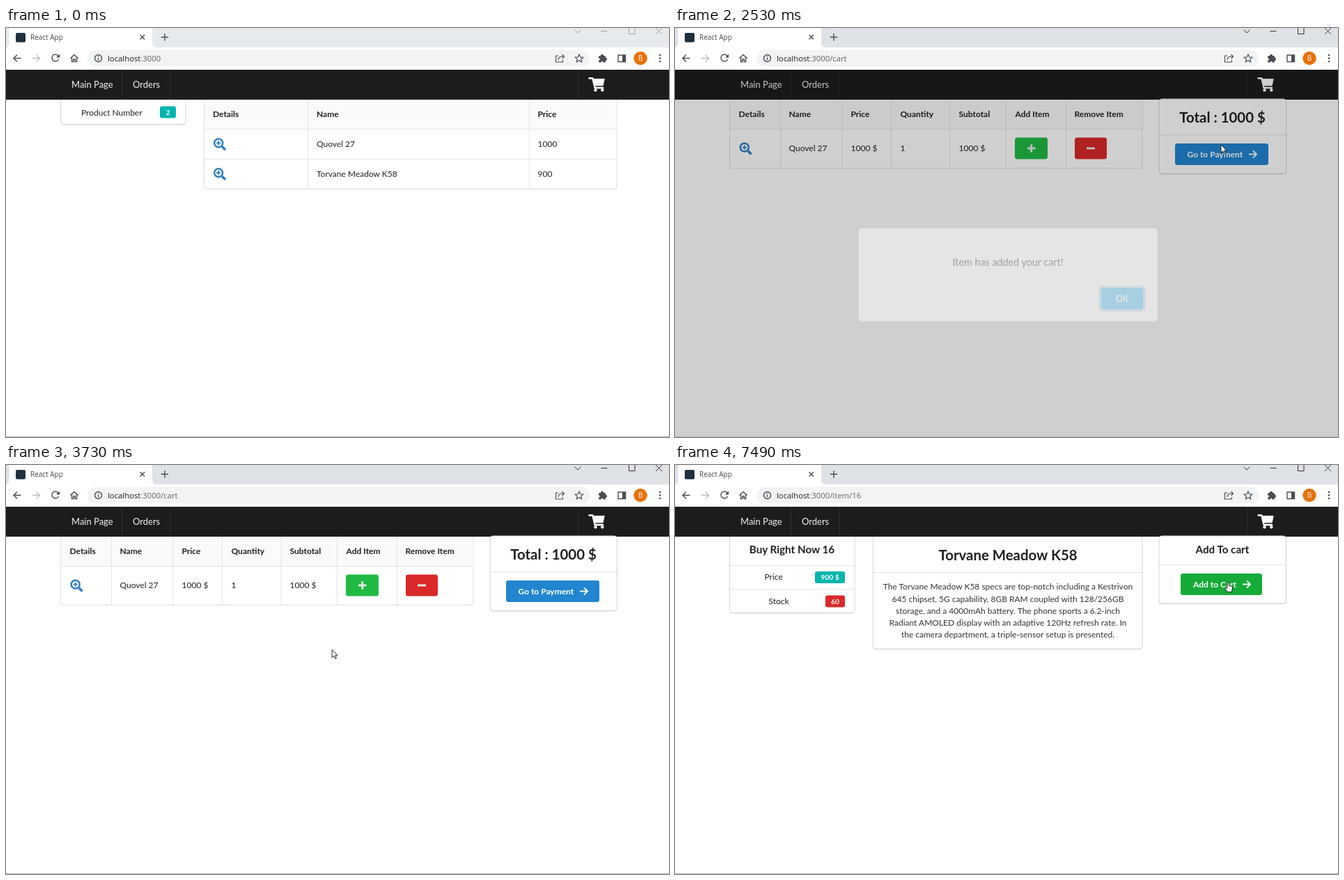
These frames come from a looping animation (952 px wide and 588 px high, 8 s). An HTML page:

```html
<!DOCTYPE html>
<html lang="en">
<head>
<meta charset="utf-8">
<title>Shop demo</title>
<style>
html, body { margin: 0; width: 100%; height: 100%; overflow: hidden; background: #fff; }
svg { display: block; width: 952px; height: 588px; font: 12px Lato, sans-serif; }
text { white-space: pre; }
.ui { font-family: "Open Sans", sans-serif; }
.line { fill: none; stroke: #4a4d51; stroke-width: 1.4; }
</style>
</head>
<body>
<svg id="stage" viewBox="0 0 952 588"></svg>
<script>
const LOOP = 8000;
const INK = '#212121', GREEN = '#21ba45', RED = '#db2828', BLUE = '#2185d0', TEAL = '#00b5ad';
const PHONE_A = 'Quovel 27', PHONE_B = 'Torvane Meadow K58';

// ---- drawing helpers (each returns SVG markup) ----
const rect = (x, y, x2, y2, fill, r = 0, more = '') =>
  `<rect x="${x}" y="${y}" width="${x2 - x}" height="${y2 - y}" rx="${r}" fill="${fill}" ${more}/>`;
const path = (d, more = 'class="line"') => `<path d="${d}" ${more}/>`;
const text = (x, y, s, { size = 12, bold = 0, mid = 0, fill = INK, more = '' } = {}) =>
  `<text x="${x}" y="${y}" font-size="${size}" fill="${fill}" ${bold ? 'font-weight="700"' : ''} ` +
  `${mid ? 'text-anchor="middle"' : ''} ${more}>${s}</text>`;
const rule = (x, y, x2, y2, color = '#e4e4e5') =>
  path(`M${x} ${y}L${x2} ${y2}`, `stroke="${color}" stroke-width="1"`);
const group = (id, body, more = '') => `<g id="${id}" ${more}>${body}</g>`;
const cut = body => `<g clip-path="url(#page)">${body}</g>`;

const card = (x, y, x2, y2) =>
  rect(x, y + 1, x2, y2 + 1, '#e0e0e1', 4) +
  rect(x, y, x2, y2, '#fff', 4, 'stroke="#d4d4d5"');

const label = (x, y, x2, s, fill) =>
  rect(x, y, x2, y + 17, fill, 3) +
  text((x + x2) / 2, y + 12.2, s, { size: 10.3, bold: 1, mid: 1, fill: '#fff' });

const arrowIcon = (x, y) =>
  path(`M${x} ${y}h10.5M${x + 6} ${y - 5}l5 5l-5 5`, 'fill="none" stroke="#eef5f0" stroke-width="2"');

const button = (id, x, y, x2, s, fill, pad) =>
  rect(x, y, x2, y + 31, fill, 3.5, `id="${id}"`) +
  text(x + pad, y + 19.5, s, { bold: 1, fill: '#fff' }) + arrowIcon(x2 - 28, y + 15.5);

const zoomIcon = (x, y) => `<g transform="translate(${x} ${y})" fill="none" stroke="#2f7fc4">
  <circle cx="-1.8" cy="-1.8" r="6" stroke-width="2.5"/>
  <path d="M3.3 3.3L8 8" stroke-width="3.6"/>
  <path d="M-5 -1.8h6.4M-1.8 -5v6.4" stroke-width="1.8"/></g>`;

function table(x, x2, y2, cols, heads, pads) {
  return rect(x, 90, x2, y2, '#fff', 3, 'stroke="#dededf"') +
    rect(x + .5, 103, x2 - .5, 145, '#f9fafb') + rule(x, 145.5, x2, 145.5) +
    cols.map(c => rule(c, 103, c, y2)).join('') +
    heads.map((h, i) => text(pads[i], 128, h, { bold: 1 })).join('');
}

// ---- browser window ----
function browser() {
  return rect(0, 0, 952, 28, '#dee1e6', 0, 'id="strip"') +
    path('M0 28Q4.5 27 4.5 21V0H210V21Q210 27 216 28Z', 'fill="#fff"') +
    rect(14, 7, 28, 20.5, '#20303f', 2) +
    text(35, 17, 'React App', { size: 10, fill: '#45494d', more: 'class="ui"' }) +
    path('M192.5 10l6.6 6.6m0 -6.6l-6.6 6.6M228 8v10.4M222.8 13.2h10.4') +
    group('controls', path('M816.5 2.5l4.5 4.5l4.5 -4.5M854.5 4.5h9M894.500 -1v9.500h8.500V-1M933 0l9 9m0 -9l-9 9',
      'fill="none" stroke="currentColor"')) +
    rect(0, 28, 952, 60, '#fff') + rect(117, 31.500, 838, 55.500, '#f1f3f4', 12) +
    path('M21.500 43.500h-10.500M16 38.500l-5 5l5 5M75 40a5 5 0 1 0 .6 5') +
    path('M38 43.500h10.500M43.500 38.500l5 5l-5 5', 'class="line" style="stroke:#bbbdc0"') +
    path('M77 37.500v5h-5z', 'fill="#4a4d51"') +
    path('M92.500 43.500l5.500 -5l5.500 5M94.500 42.500v6h2.300v-3.500h2.500v3.500h2.300v-6') +
    '<circle cx="132.500" cy="43.500" r="5" class="line"/>' +
    path('M132.500 42.800v3.400M132.500 40.400v1.300') +
    `<text x="146" y="47.500" font-size="11.3" class="ui" fill="#202124">localhost<tspan id="url" fill="#5f6368"></tspan></text>` +
    path('M793 40h-3.500v9h10v-3M793 46q.5 -5 5 -5h3M798.500 38l3 3l-3 3', 'class="line" style="stroke-width:1.1"') +
    path('M823 38l1.700 3.800l4.100 .4l-3.100 2.700l.9 4l-3.600 -2.100l-3.600 2.100l.9 -4l-3.100 -2.700l4.100 -.4z', 'class="line" style="stroke-width:1.2"') +
    rect(851, 40, 861, 49.500, '#4a4d51', 1.5) +
    '<circle cx="856" cy="39.800" r="2.100" fill="#4a4d51"/><circle cx="861" cy="44.800" r="2.100" fill="#4a4d51"/>' +
    '<circle cx="851.500" cy="45" r="1.500" fill="#fff"/><circle cx="856" cy="49.300" r="1.500" fill="#fff"/>' +
    path('M879 39h10.500v9.500h-10.500z') + rect(885, 39, 890, 48.5, '#4a4d51') +
    '<circle cx="911" cy="43.500" r="9.700" fill="#e8710a"/>' +
    text(911, 47.3, 'B', { size: 10, mid: 1, fill: '#fff', more: 'class="ui"' }) +
    [39, 43.5, 48].map(y => `<circle cx="939" cy="${y}" r="1.350" fill="#4a4d51"/>`).join('');
}

function navBar() {
  return rect(0, 59.5, 952, 103, '#1b1c1d') +
    [166.5, 236, 822].map(x => rule(x, 60, x, 103, '#2d2e2f')).join('') +
    text(94, 85.500, 'Main Page', { size: 13, fill: '#f2f2f2' }) +
    text(182, 85.500, 'Orders', { size: 13, fill: '#f2f2f2' }) +
    path('M837.500 72.200h4.800l3.300 13.800h11.500', 'fill="none" stroke="#fff" stroke-width="2.400" stroke-linejoin="round" stroke-linecap="round"') +
    path('M842.500 73.300h16.700l-2.100 9.500h-12.500z', 'fill="#fff" stroke="#fff" stroke-linejoin="round"') +
    '<circle cx="846.500" cy="89.200" r="2.200" fill="#fff"/><circle cx="856.300" cy="89.200" r="2.200" fill="#fff"/>';
}

// ---- pages ----
function homePage() {
  const row = (y, name, price) => zoomIcon(307, y + .7) + text(446, y + 4.3, name) + text(763.5, y + 4.3, price);
  return cut(card(78.5, 90, 258, 138.5) + text(108, 125.5, 'Product Number') + label(221, 112.5, 244, '2', TEAL) +
    table(284.5, 877, 231.5, [433.5, 751.5], ['Details', 'Name', 'Price'], [297, 446, 763.5]) +
    rule(284.5, 188.5, 877, 188.5) + row(166.5, PHONE_A, '1000') + row(209.3, PHONE_B, '900'));
}

function itemPage(id, name, price, lines) {
  const wide = price.length > 5;
  return cut(card(78.5, 90, 258, 212.5) +
    text(168, 127, 'Buy Right Now ' + id, { size: 15.2, bold: 1, mid: 1 }) +
    rule(79, 144.5, 258, 144.5) + text(wide ? 125.5 : 128.5, 165, 'Price') +
    label(wide ? 196 : 201, 153, 244, price, TEAL) +
    rule(79, 178.5, 258, 178.5) + text(134.5, 199.5, 'Stock') + label(216, 187.5, 244, '60', RED) +
    card(284.5, 90, 671, 161.5 + lines.length * 17.2 + 17) +
    text(478, 136.5, name, { size: 20.4, bold: 1, mid: 1 }) + rule(285, 154.5, 671, 154.5) +
    lines.map((s, i) => text(478, 179.3 + i * 17.2, s, { mid: 1, fill: '#333' })).join('')) +
    card(695, 102, 877.5, 199) + text(786, 126.5, 'Add To cart', { size: 15.2, bold: 1, mid: 1 }) +
    rule(695, 143.5, 877, 143.5) + button('add' + id, 726, 156, 843, 'Add to Cart', GREEN, 18);
}

function cartPage() {
  const pads = [91.5, 163.5, 252.5, 323.5, 407.5, 488.5, 573.5];
  const cells = ['', PHONE_A, '1000 $', '1', '1000 $'];
  const sign = d => path(d, 'stroke="#e3ebe0" stroke-width="3"');
  return cut(table(78.5, 671, 201.5, [151.5, 240, 310.5, 395, 475.5, 561.5],
    ['Details', 'Name', 'Price', 'Quantity', 'Subtotal', 'Add Item', 'Remove Item'], pads) +
    zoomIcon(101.5, 173.5) + cells.map((s, i) => text(pads[i], 177, s)).join('') +
    rect(488, 157.5, 535, 188.5, GREEN, 3.5) + sign('M506 173h11.500M511.700 167.300v11.500') +
    rect(574, 157.5, 620, 188.5, RED, 3.5) + sign('M591 173h12')) +
    card(695, 102, 877.5, 209.5) + text(786, 136, 'Total : 1000 $', { size: 20.4, bold: 1, mid: 1 }) +
    rule(695, 153.5, 877, 153.5) + button('pay', 718, 166, 852, 'Go to Payment', BLUE, 17.5);
}

function dialog() {
  return rect(0, 59.5, 952, 588, '#000', 0, 'id="shade"') + group('modal',
    rect(273.5, 291, 683, 418.5, '#fff', 4) +
    text(478, 342.5, 'Item has added your cart!', { size: 13.7, mid: 1, fill: '#6d6d6d' }) +
    rect(603, 370, 666.5, 405, '#c3d6e4', 5.5) + rect(604.5, 371.5, 665, 403.5, '#fff', 4.5) +
    rect(605.5, 372.5, 664, 402.5, '#7cd1f9', 4, 'id="ok"') +
    text(634.7, 391.8, 'OK', { bold: 1, mid: 1, fill: '#fff' }));
}

const pointer = group('cursor',
  '<circle id="click" r="10" fill="rgb(230,225,0)" opacity=".65"/>' +
  path('M0 0V11.300L2.700 8.900L4.600 13L6.300 12.200L4.500 8.200H8Z', 'id="arrow" fill="#fff" stroke="#111" stroke-width=".9"') +
  path('M-1 1Q0 -.6 1.200 1V5.500L5.500 6.500Q6.700 7 6.500 9L5.300 14.500H-.5L-4 9.800Q-4.500 8 -2.700 8L-1 9.500Z', 'id="hand" fill="#fff" stroke="#111" stroke-width=".9" stroke-linejoin="round"'));

const linesA = [
  'The Quovel 27 Neo and Neo Top feature a new Clear Sorvia HQX',
  'display with updated GlideRate technology that allows for an',
  'Always-On display, a first for a Quovel. The Always-On display is',
  'made possible through a new 1Hz to 120Hz refresh rate along with',
  'improved power efficient technologies. When the Always-On display',
  'is active, the time, widgets, and Pulse Briefings remain available at a',
  'glance at all times, and the wallpaper is dimmed.'];
const linesB = [
  'The Torvane Meadow K58 specs are top-notch including a Kestrivon',
  '645 chipset, 5G capability, 8GB RAM coupled with 128/256GB',
  'storage, and a 4000mAh battery. The phone sports a 6.2-inch',
  'Radiant AMOLED display with an adaptive 120Hz refresh rate. In',
  'the camera department, a triple-sensor setup is presented.'];

document.getElementById('stage').innerHTML =
  '<defs><clipPath id="page"><rect y="103" width="952" height="485"/></clipPath></defs>' +
  rect(0, 0, 952, 588, '#fff') + navBar() +
  group('home', homePage()) + group('item6', itemPage(6, PHONE_A, '1000 $', linesA)) +
  group('item16', itemPage(16, PHONE_B, '900 $', linesB)) + group('cart', cartPage()) +
  dialog() + browser() + rule(0, 587.5, 952, 587.5, '#b5b5b5') + pointer;

// ---- timeline ----
// Bursts of movement: first step, last step, number of steps.
const bursts = [[190, 910, 8], [1110, 1910, 9], [2010, 2730, 8], [2830, 3530, 8], [3640, 4150, 6],
  [4350, 5150, 9], [5250, 5770, 6], [5970, 6770, 9], [6870, 7490, 7]];
// Pointer way points: time, x, y.
const way = [[190, 905, 566], [490, 610, 270], [700, 372, 110], [910, 312, 165], [1310, 310, 166],
  [1600, 480, 190], [1910, 715, 178], [2100, 784, 168], [2730, 784, 168], [2830, 765, 195], [3130, 655, 365],
  [3230, 628, 391], [3330, 625, 392], [3530, 540, 297], [4150, 330, 205], [4350, 290, 180],
  [4750, 152, 95], [4900, 122, 81], [5150, 120, 81], [5460, 330, 270], [5560, 490, 325], [5770, 400, 240],
  [5970, 372, 225], [6170, 332, 208], [6290, 311, 208], [6500, 311, 208], [6770, 388, 228],
  [6870, 450, 222], [7290, 760, 176], [7490, 794, 168]];
const pages = [[0, 'home', ''], [1310, 'item6', '/item/6'], [2230, 'item6', '/cart'],
  [2415, 'cart', '/cart'], [5040, 'home', ''], [6460, 'item16', '/item/16']];
const hands = [[800, 1400], [2000, 2300], [3120, 3400], [4830, 5300], [6260, 6550], [7260, 8000]];
const clicks = [[1205, 1300], [2110, 2220], [3320, 3425], [4940, 5040], [6360, 6450]];
const fade = [[2400, 0], [2520, .45], [2640, 1], [3330, 1], [3430, .55], [3530, .2], [3640, 0]];
const pop = [[2400, .5], [2520, 1.05], [2630, .97], [2730, 1]];

const $ = id => document.getElementById(id);
const show = (id, on) => $(id).setAttribute('display', on ? 'inline' : 'none');
const within = (spans, t) => spans.some(([a, b]) => t >= a && t < b);

function snap(t) {
  const b = bursts.filter(([start]) => t >= start).pop();
  if (!b) return 0;
  const gap = (b[1] - b[0]) / (b[2] - 1);
  return b[0] + Math.min(b[2] - 1, Math.floor((t - b[0]) / gap + .15)) * gap;
}

function at(keys, t, col = 1) {
  const i = keys.findIndex(k => k[0] > t);
  if (i === 0) return keys[0][col];
  if (i < 0) return keys[keys.length - 1][col];
  const a = keys[i - 1], b = keys[i];
  return a[col] + (b[col] - a[col]) * (t - a[0]) / (b[0] - a[0]);
}

function draw(now) {
  const t = snap(now);
  const [, page, url] = pages.filter(p => t >= p[0]).pop();
  for (const id of ['home', 'item6', 'item16', 'cart']) show(id, id === page);
  $('url').textContent = ':3000' + url;

  const active = t >= 1200;
  $('strip').setAttribute('fill', active ? '#dee1e6' : '#e7eaed');
  $('controls').setAttribute('color', active ? '#333' : '#a0a2a5');

  const hand = within(hands, t);
  show('cursor', t >= 190);
  show('hand', hand);
  show('arrow', !hand);
  show('click', within(clicks, t));
  $('cursor').setAttribute('transform', `translate(${at(way, t)} ${at(way, t, 2)})`);
  $('add6').setAttribute('fill', t >= 2105 ? '#198f35' : t >= 1985 ? '#16ab39' : GREEN);
  $('add16').setAttribute('fill', t >= 7260 ? '#16ab39' : GREEN);
  $('ok').setAttribute('fill', hand ? '#78cbf2' : '#7cd1f9');

  const dim = at(fade, t), scale = at(pop, t);
  $('shade').setAttribute('opacity', dim * .4);
  $('modal').setAttribute('opacity', t > 3360 ? Math.max(0, dim * 1.3 - .24) : dim);
  $('modal').setAttribute('transform', `translate(478 355) scale(${scale}) translate(-478 -355)`);
}

function tick() {
  draw(performance.now() % LOOP);
  requestAnimationFrame(tick);
}
tick();
</script>
</body>
</html>
```
